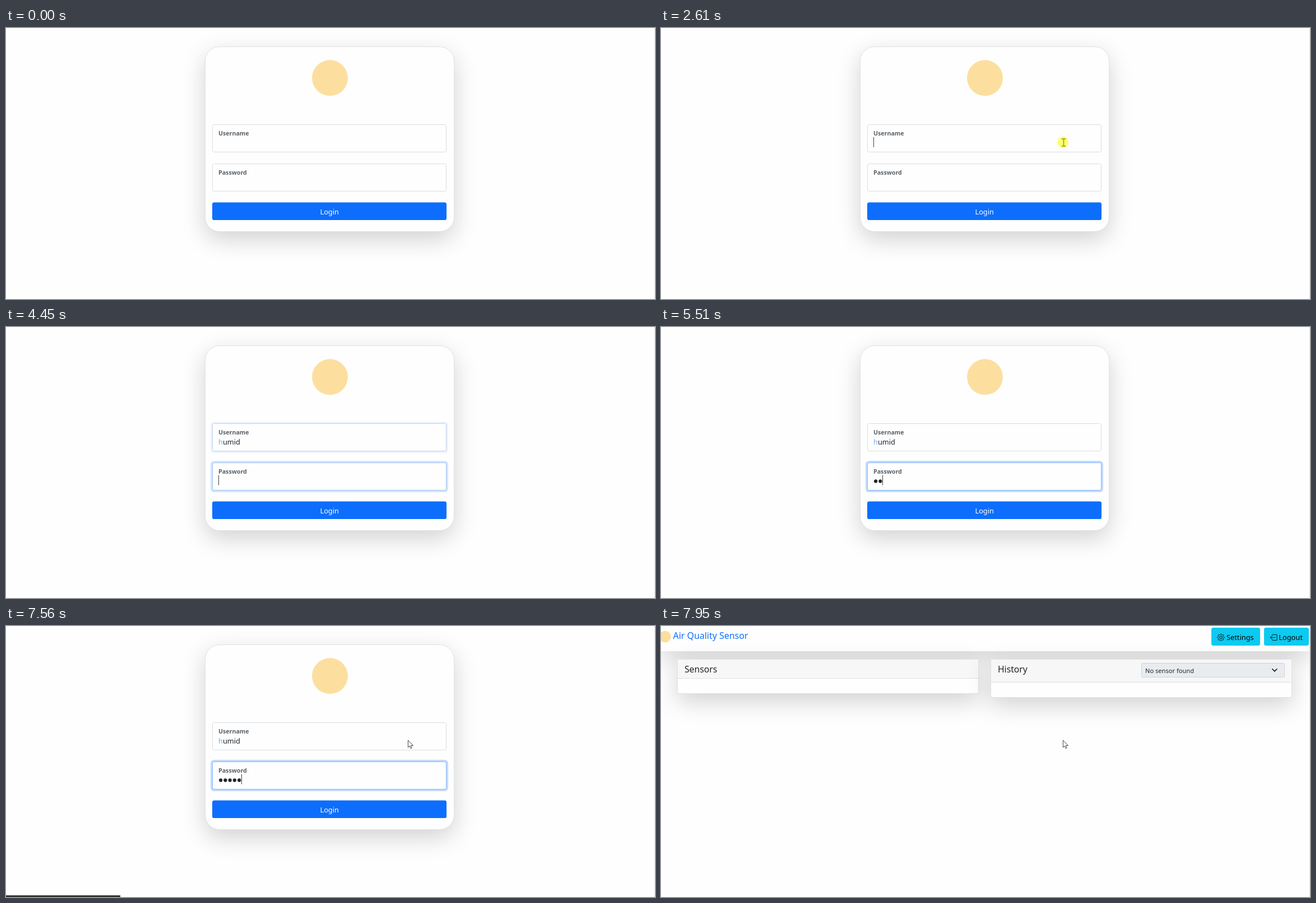
These frames come from a looping animation (1158x484 px, 8000 ms). An HTML page:

```html
<!DOCTYPE html>
<html lang="en">
<head>
<meta charset="utf-8">
<title>Sensor login</title>
<style>
  html, body { margin: 0; width: 100%; height: 100%; overflow: hidden; background: #fefefe; }
  #stage { position: relative; width: 1158px; height: 484px; overflow: hidden; }
  #stage div { position: absolute; box-sizing: border-box; }
  .page { left: 0; top: 0; width: 1158px; height: 484px; }
  .card { background: #fefefe; border: 1px solid #e2e2e2; border-radius: 3.4px;
    box-shadow: 0 13.65px 41px rgba(0, 0, 0, .175); }
  .head { left: 0; top: 0; width: 100%; background: #f7f7f7; border-bottom: 1px solid #dfdfdf; }
  .field, .ring { left: 368px; width: 418px; height: 50px; border: 1px solid #d8dce0; border-radius: 3.4px; }
  .ring { border-color: #86b7fe; box-shadow: 0 0 0 3px rgba(13, 110, 253, .25); }
  .user { top: 172px; }
  .pass { top: 242px; }
  .btn { background: #0dcaf0; border-radius: 3.4px; }
  svg { position: absolute; left: 0; top: 0; }
  text { font: 12.8px "Noto Sans", "Open Sans", sans-serif; fill: #212529; white-space: pre; }
  text.label { font-size: 10.65px; font-weight: 700; fill: #5a6268; }
  text.title { font-size: 15.7px; }
  .line { fill: none; stroke: #111; stroke-linecap: round; stroke-linejoin: round; }
</style>
</head>
<body>
<div id="stage">
  <div id="login" class="page">
    <div class="card" style="left:354.5px;top:33px;width:445px;height:331px;border-radius:26px"></div>
    <div class="field user"></div>
    <div class="field pass"></div>
    <div class="ring user" id="ringUser"></div>
    <div class="ring pass" id="ringPass"></div>
    <svg width="1158" height="484">
      <rect x="368" y="311.4" width="418" height="31.7" rx="3.4" fill="#0d6efd"/>
      <circle cx="578" cy="89.3" r="32" fill="#fcdf9f"/>
      <text class="label" x="379" y="192.3">Username</text>
      <text class="label" x="379" y="262">Password</text>
      <text x="577.2" y="333" text-anchor="middle" style="fill:#fff">Login</text>
      <text id="user" x="379" y="210.4"><tspan id="first" fill="#78aeef"></tspan><tspan id="rest"></tspan></text>
      <g id="dots" fill="#212529"></g>
      <rect id="caret" width="1" height="18" fill="#3c4044"/>
    </svg>
    <div id="status" style="left:0;width:204px;height:6px;background:#333"></div>
  </div>

  <div id="board" class="page">
    <div style="left:0;top:0;width:1158px;height:44.5px;background:#fefefe;box-shadow:0 13.65px 41px rgba(0,0,0,.175)"></div>
    <div class="btn" style="left:982px;top:3px;width:87px;height:32px"></div>
    <div class="btn" style="left:1075.5px;top:3px;width:80.5px;height:32px"></div>
    <div class="card" style="left:28.5px;top:58.5px;width:538px;height:62.5px"><div class="head" style="height:34.5px"></div></div>
    <div class="card" style="left:587.5px;top:58.5px;width:538.5px;height:69px"><div class="head" style="height:41px"></div></div>
    <div style="left:856.5px;top:65.5px;width:256px;height:26.5px;background:#e9ecef;border:1px solid #ced4da;border-radius:2.8px"></div>
    <svg width="1158" height="484">
      <circle cx="7.5" cy="19" r="10.3" fill="#fcdf9f"/>
      <text class="title" x="21.5" y="22.6" style="fill:#0d6efd;font-size:15.95px">Air Quality Sensor</text>
      <text x="1009" y="24.6" style="fill:#000">Settings</text>
      <text x="1102.3" y="24.6" style="fill:#000">Logout</text>
      <text class="title" x="42" y="82.6">Sensors</text>
      <text class="title" x="601" y="82.6">History</text>
      <text x="864" y="83.6" style="font-size:11.1px">No sensor found</text>
      <path class="line" stroke-width="1.5" d="M1090.7 76.7l4.2 4.2 4.2-4.2"/>
      <path id="gear" class="line"/>
      <circle class="line" cx="999" cy="20.3" r="2.4"/>
      <path class="line" d="M1090.5 17.6v-1.3q0-.9.9-.9h6.8q.9 0 .9.9v8.4q0 .9-.9.9h-6.8q-.9 0-.9-.9v-1.3M1096 20.5h-8.8M1089.8 17.9l-2.6 2.6 2.6 2.6"/>
    </svg>
  </div>

  <svg width="1158" height="484">
    <path d="M1157.5 0V484" stroke="#e6e6e6"/>
    <path id="beam" fill="none" stroke="#111" stroke-width="1.4" d="M-3.6-6.5H-1Q0-6.5 0-5.5Q0-6.5 1-6.5H3.6M0-6V6M-3.6 6.5H-1Q0 6.5 0 5.5Q0 6.5 1 6.5H3.6"/>
    <path id="arrow" fill="#fff" stroke="#444" d="M0 0V12.9L2.9 10.2 4.8 14.7 6.8 13.8 4.9 9.5H9Z"/>
    <circle id="spot" cx="717" cy="204" r="10" fill="#ff0" opacity=".55"/>
  </svg>
</div>

<script>
const LOOP = 8000, TICK = 98.5, NAME = "humid", LEFT = 379, DOT = 8.25;
const ENTER = 850, TURN = 1540, REST = 2040, PRESS = 2520, CLICK = 2610;
const TAB = 4360, RETURN = 7360, BOARD = 7850;
const nameKeys = [2810, 3190, 3400, 3780, 4070];
const passKeys = [5130, 5510, 5890, 6180, 6580];

const $ = id => document.getElementById(id);
const show = (id, on) => { $(id).style.visibility = on ? "visible" : "hidden"; };
const ramp = (t, from, to) => Math.min(1, Math.max(0, (t - from) / (to - from)));
const mix = (a, b, u) => a.map((v, i) => v + (b[i] - v) * u);
const pressed = (keys, t) => keys.filter(k => k <= t).length;

const dots = passKeys.map((_, i) => {
  const c = document.createElementNS("http://www.w3.org/2000/svg", "circle");
  c.setAttribute("cx", LEFT + DOT * (i + .5));
  c.setAttribute("cy", 275.4);
  c.setAttribute("r", 3.1);
  return $("dots").appendChild(c);
});

const rim = Array.from({ length: 96 }, (_, i) => {
  const a = i / 96 * 2 * Math.PI, r = 5.5 + Math.cos(8 * a);
  return (999 + r * Math.cos(a)).toFixed(2) + " " + (20.3 + r * Math.sin(a)).toFixed(2);
});
$("gear").setAttribute("d", "M" + rim.join("L") + "Z");

// Swings in slowing down, then climbs evenly to the first field.
function pointerAt(t) {
  if (t >= RETURN) return [717.4, 204];
  const s = ENTER + Math.floor((t - ENTER) / TICK) * TICK;
  const turn = [702.5, 259];
  return s < TURN - 1
    ? mix([923, 342], turn, 1 - (1 - ramp(s, ENTER, TURN)) ** 2)
    : mix(turn, [718.5, 204.5], ramp(s, TURN, REST));
}

function drawPointer(t) {
  const [x, y] = pointerAt(t);
  const on = t >= RETURN || t >= ENTER && t < nameKeys[0];
  const text = t < RETURN && x < 786 && y < 291;
  show("beam", on && text);
  show("arrow", on && !text);
  $(text ? "beam" : "arrow").setAttribute("transform", `translate(${x} ${y})`);
  show("spot", t >= PRESS && t < nameKeys[0]);
}

function drawForm(t) {
  const n = pressed(nameKeys, t), m = pressed(passKeys, t), inPass = t >= TAB;
  $("first").textContent = NAME.slice(0, Math.min(n, 1));
  $("rest").textContent = NAME.slice(1, Math.max(n, 1));
  dots.forEach((d, i) => { d.style.display = i < m ? "" : "none"; });

  const swap = ramp(t, TAB - 50, TAB + 150);
  $("ringUser").style.opacity = ramp(t, CLICK + 90, CLICK + 240) * (1 - swap);
  $("ringPass").style.opacity = swap;

  const width = inPass ? m * DOT : n ? $("user").getComputedTextLength() : 0;
  $("caret").setAttribute("x", Math.floor(LEFT + width));
  $("caret").setAttribute("y", inPass ? 264.5 : 195);
  show("caret", t >= CLICK);
  $("status").style.top = 484 - 3.5 * ramp(t, RETURN, RETURN + 200) + "px";
}

function render(t) {
  const board = t >= BOARD;
  $("login").style.display = board ? "none" : "block";
  $("board").style.display = board ? "block" : "none";
  // An explicit "visible" would otherwise survive a hidden parent.
  drawPointer(t);
  if (!board) drawForm(t);
}

const start = performance.now();
function tick() {
  render((performance.now() - start) % LOOP);
  requestAnimationFrame(tick);
}
tick();
</script>
</body>
</html>
```
